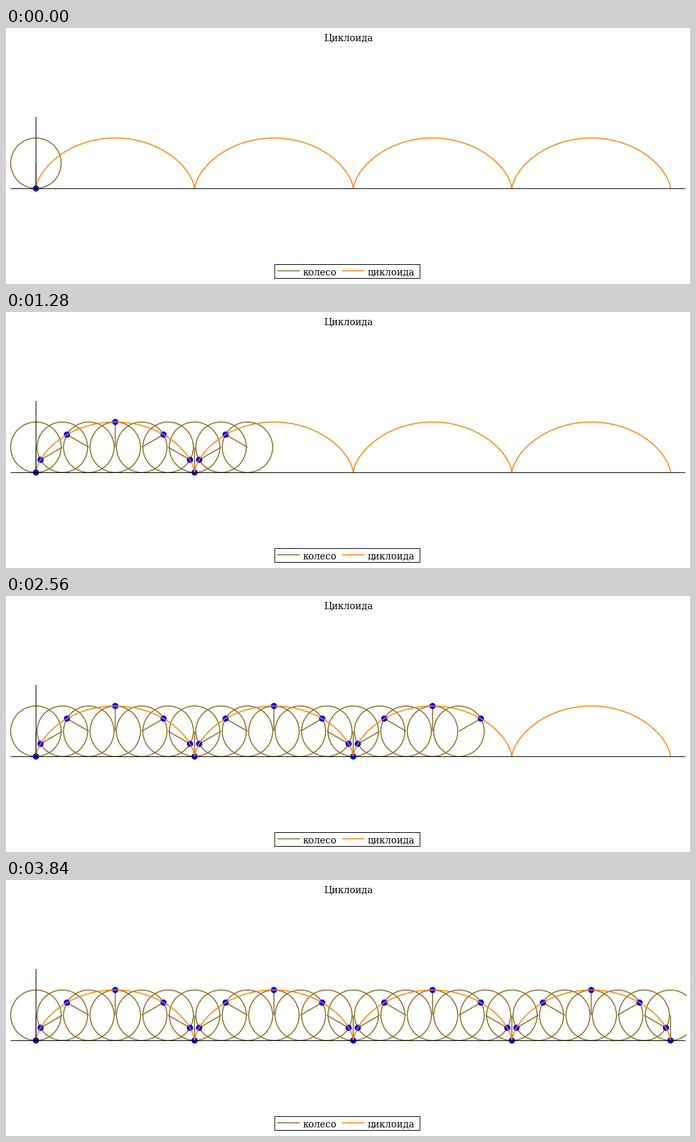
These frames come from a looping animation (1036x388 px, 4000 ms). A matplotlib script:

```python
import numpy as np
import matplotlib.pyplot as plt
from matplotlib.animation import FuncAnimation
from matplotlib.patches import Circle, Rectangle

W, H, DPI = 1036, 388, 100
PX = 72 / DPI  # points per pixel
STEPS, TURNS = 24, 4
X0, X_END = 45.33, 1006.53
GROUND = 243.2
R = (X_END - X0) / (2 * np.pi * TURNS)
BROWN, ORANGE, BLUE, BLACK = "#8b6b22", "#ff8000", "#0000ff", "#000000"

plt.rcParams["toolbar"] = "None"
fig = plt.figure(figsize=(W / DPI, H / DPI), dpi=DPI, facecolor="white")
ax = fig.add_axes([0, 0, 1, 1])
ax.set_xlim(0, W)
ax.set_ylim(H, 0)
ax.axis("off")


def line(x, y, color, width, z):
    return ax.plot(x, y, color=color, lw=width * PX, zorder=z,
                   solid_capstyle="butt", snap=False)[0]


def label(x, y, text, align):
    ax.text(x, y, text, family="DejaVu Serif", size=14.1 * PX,
            ha=align, va="baseline", color=BLACK, zorder=6)


def cycloid(t):
    return X0 + R * (t - np.sin(t)), GROUND - R * (1 - np.cos(t))


def wheel(t):
    """Rim, spoke and rim point of the wheel after rolling by angle t."""
    cx, cy = X0 + R * t, GROUND - R
    px, py = cycloid(t)
    rim = ax.add_patch(Circle((cx, cy), R, fill=False, ec=BROWN,
                              lw=1.5 * PX, zorder=1, snap=False))
    spoke = line([cx, px], [cy, py], BROWN, 1.5, 1)
    dot = ax.add_patch(Circle((px, py), 4.7, fc=BLUE, lw=0, zorder=2,
                              snap=False))
    parts = [rim, spoke, dot]
    for part in parts:
        part.set_clip_path(view)
    return parts


view = Rectangle((5, 0), 1026, H, transform=ax.transData)

line(*cycloid(np.linspace(0, 2 * np.pi * TURNS, 801)), ORANGE, 1.5, 3)
line([7, 1029], [243.5, 243.5], BLACK, 1, 4)
line([45.5, 45.5], [135, 243.5], BLACK, 1, 4)

label(518, 20, "Циклоида", "center")
ax.add_patch(Rectangle((407, 358.5), 220, 21, fill=False, ec=BLACK,
                       lw=PX, zorder=5, snap=False, joinstyle="miter"))
for x, color, name in [(411, BROWN, "колесо"), (509, ORANGE, "циклоида")]:
    line([x, x + 34], [368, 368], color, 1.5, 5)
    label(x + 38.5, 375, name, "left")

wheels = [wheel(2 * np.pi * TURNS * k / STEPS) for k in range(STEPS + 1)]


def update(frame):
    for k, parts in enumerate(wheels):
        for part in parts:
            part.set_visible(k <= frame)
    return [part for parts in wheels for part in parts]


anim = FuncAnimation(fig, update, frames=STEPS + 1, interval=160,
                     repeat=True, repeat_delay=0, blit=False)
plt.show()
```
